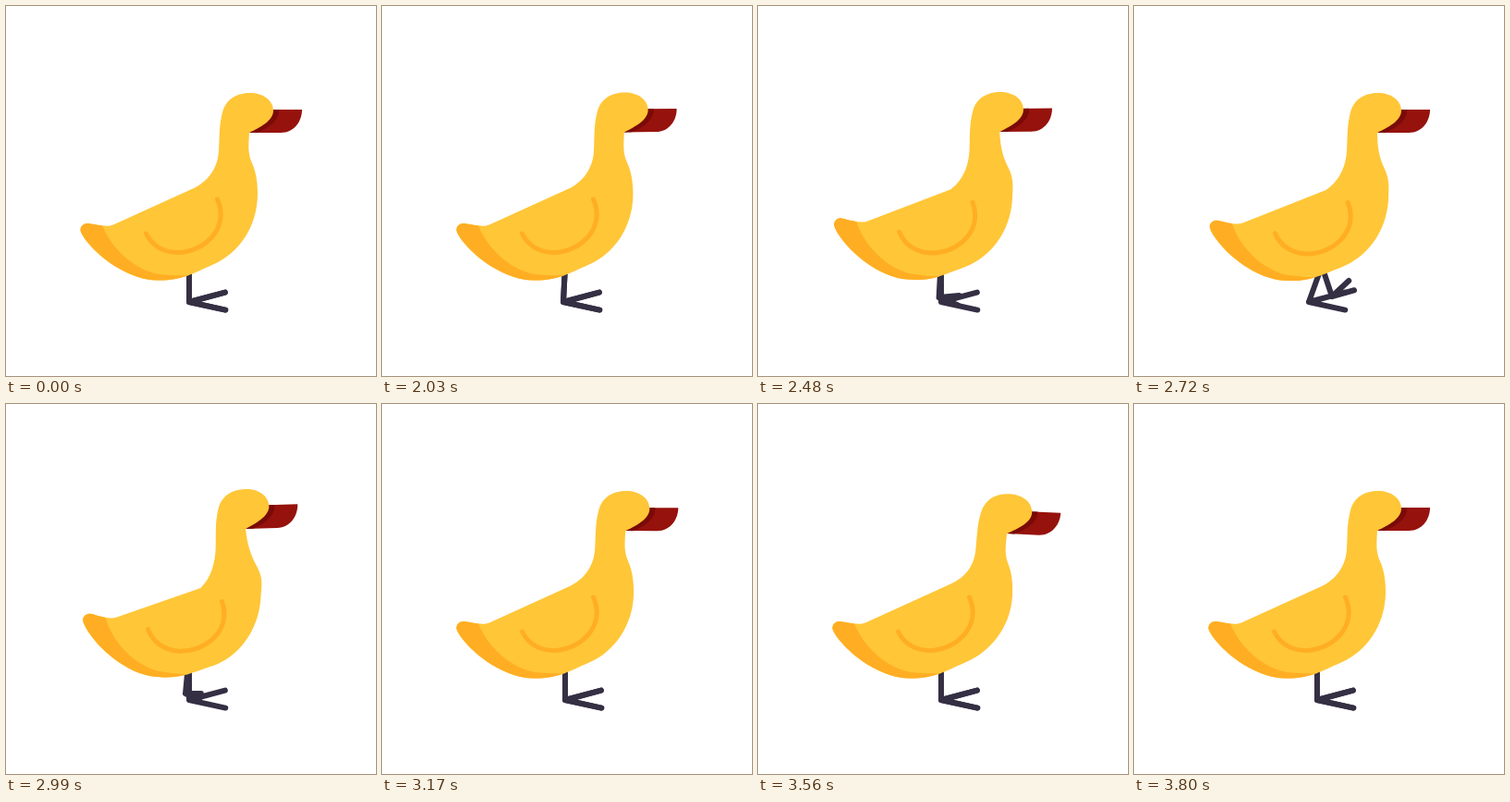
An HTML page for the animation above (3.86 s loop, 400x400 px).

```html
<!DOCTYPE html>
<html>
<head>
<meta charset="utf-8">
<style>
  html, body { margin: 0; height: 100%; overflow: hidden; background: #fff; }
  svg { display: block; width: 100vw; height: 100vh; }
  .line { fill: none; stroke-linecap: round; stroke-linejoin: round; }
</style>
</head>
<body>
<svg viewBox="0 0 400 400">
  <clipPath id="clip"><path id="clipShape"/></clipPath>
  <g class="line" stroke="#352f44" stroke-width="6">
    <path id="legA"/>
    <path id="legB"/>
  </g>
  <g id="beak">
    <path fill="#96120c" d="M280 112H320C320 124 312 137 297 137H263Z"/>
    <path fill="#7a0a07" d="M280 112H295C296 123 284 132 271 137H263Z"/>
  </g>
  <path id="body" fill="#ffc637"/>
  <g clip-path="url(#clip)">
    <path id="shade" fill="#ffae23" d="M103 234C111 258 135 284 165 290Q184 292 203 291V312H60V220Z"/>
  </g>
  <path id="wing" class="line" stroke="#ffae23" stroke-width="5" d="M151.5 246C158 260 172 267 187 266.5C215 265 242 240 228.5 209"/>
</svg>
<script>
const LOOP = 3860, START = 2010, STEP = 540, TICK = 30;
const $ = id => document.getElementById(id);
const clamp = v => Math.min(1, Math.max(0, v));
const rad = deg => deg * Math.PI / 180;

const outline = 'M80.5 243C80 238 84 235 88 235S108 240 116 236.5L204 196.5'
  + 'C222 187 229 172 230 157S230 130 234 115S250 94 264 94S289 102 289 113S275 131 263 137'
  + 'C262 152 261.5 160 266 170S272 191 272 203'
  + 'C272 240 250 268 225 279S190 297 163 296.5S108 277 93 261Q82 249 80.5 243Z';

// Step phase, body pitch, body drop
const pitch = [[20, 0, 0], [170, .3, 2], [260, 1, 0], [440, .55, 1.5], [540, 0, 0]];

// Time, head reach
const reach = [
  [2010, 0], [2030, -.1], [2180, 0], [2290, 0], [2490, -.15], [2690, 0],
  [2800, 0], [3050, -.4], [3380, 1], [3420, 1], [3725, -.07], [3800, 0]
];

// Step phase, hip x, ankle x, ankle y, foot angle, foot length
const rest = [198, 198, 320, 0, 1];
const setOff = [20, 198, 196, 320, 0, 1];
const pushing = [
  [0, ...rest], setOff, [170, 203, 189, 320, 0, 1],
  [260, 190, 181, 308, 38, .62], [440, 197, 194, 313, 15, .42], [540, ...rest]
];
const swinging = [[0, ...rest], setOff, [170, 203, 214, 314, -28, .62], [260, ...rest], [540, ...rest]];

// Monotone cubic interpolation through keyed rows
function sample(keys, t) {
  const last = keys.length - 1;
  if (t <= keys[0][0]) return keys[0].slice(1);
  if (t >= keys[last][0]) return keys[last].slice(1);
  const i = keys.findIndex(k => k[0] > t) - 1;
  const rise = (j, c) => j < 0 || j >= last ? 0 : (keys[j + 1][c] - keys[j][c]) / (keys[j + 1][0] - keys[j][0]);
  const slope = (j, c) => {
    const a = rise(j - 1, c), b = rise(j, c);
    return a * b > 0 ? 2 * a * b / (a + b) : 0;
  };
  const span = keys[i + 1][0] - keys[i][0], u = (t - keys[i][0]) / span, v = 1 - u;
  return keys[i].slice(1).map((from, n) => {
    const c = n + 1;
    return from * v * v * (1 + 2 * u) + keys[i + 1][c] * u * u * (3 - 2 * u)
      + span * u * v * (slope(i, c) * v - slope(i + 1, c) * u);
  });
}

// A rotation about (cx, cy) plus a shift, usable on points and as an attribute
function motion(deg, cx, cy, dx, dy) {
  const cos = Math.cos(rad(deg)), sin = Math.sin(rad(deg));
  return {
    delta: (x, y) => [
      (x - cx) * (cos - 1) - (y - cy) * sin + dx,
      (x - cx) * sin + (y - cy) * (cos - 1) + dy
    ],
    attr: `translate(${dx} ${dy}) rotate(${deg} ${cx} ${cy})`
  };
}

// Each outline point follows body and head by its height, with the neck blending both
function outlinePath(body, head) {
  return outline.replace(/([\d.]+) ([\d.]+)/g, (_, px, py) => {
    const x = +px, y = +py, front = x > 240;
    const b = clamp(front ? (y - 148) / 18 : (y - 182) / 14);
    const h = clamp(front ? (265 - y) / 30 : (196 - y) / 8);
    const p = body.delta(x, y), q = head.delta(x, y);
    return (x + b * p[0] + h * q[0]).toFixed(2) + ' ' + (y + b * p[1] + h * q[1]).toFixed(2);
  });
}

function legPath([hip, x, y, angle, size]) {
  const toe = deg => {
    const a = rad(angle + deg), len = 40.2 * size;
    return `M${x} ${y}l${len * Math.cos(a)} ${len * Math.sin(a)}`;
  };
  return `M${hip} 281L${x} ${y}` + toe(-15) + toe(12.3);
}

function draw(t) {
  const walk = t - START;
  const phase = walk > 0 && walk < 2 * STEP ? walk % STEP : 0;
  const [tilt, drop] = sample(pitch, phase);
  const [h] = sample(reach, t);
  const body = motion(9.5 * tilt, 196.5, 266, 0, drop);
  const head = motion(5 * h, 264, 115, 13.5 * h, 6 * h);
  const d = outlinePath(body, head);
  $('body').setAttribute('d', d);
  $('clipShape').setAttribute('d', d);
  $('shade').setAttribute('transform', body.attr);
  $('wing').setAttribute('transform', body.attr);
  $('beak').setAttribute('transform', head.attr);
  $('legA').setAttribute('d', legPath(sample(pushing, phase)));
  $('legB').setAttribute('d', legPath(sample(swinging, phase)));
}

const begin = performance.now();
function frame() {
  const t = Math.max(0, performance.now() - begin) % LOOP;
  // Motion advances in held ticks
  draw(t < 2030 ? 0 : 2030 + Math.floor((t - 2030) / TICK) * TICK);
  requestAnimationFrame(frame);
}
frame();
</script>
</body>
</html>
```
